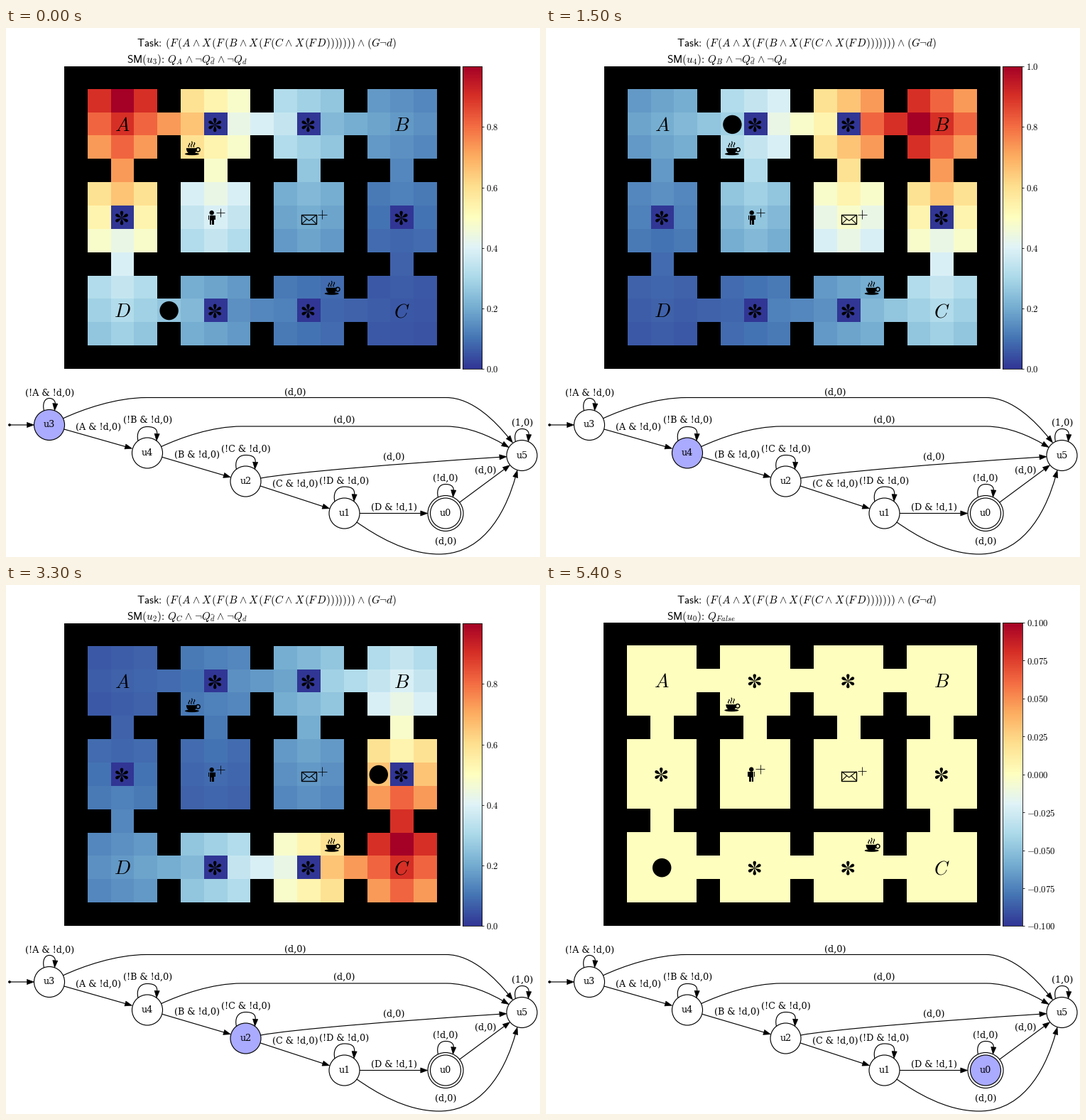
A matplotlib script that plays this animation: 752 by 745 pixels, repeating every 5.5 s.

```python
import numpy as np
import matplotlib.pyplot as plt
from matplotlib.animation import FuncAnimation
from matplotlib.patches import Circle, Ellipse, PathPatch, Polygon, Rectangle
from matplotlib.path import Path
from matplotlib.transforms import Affine2D

W, H, DPI = 752, 745, 64
COLS, ROWS, CELL = 17, 13, 32.8
FRAMES, STEP_MS = 55, 100
GAMMA = 0.9
ACTIVE = "#aaaaff"

plt.rcParams.update({"mathtext.fontset": "cm", "font.family": "DejaVu Serif"})


def px(v):
    """Pixels to points."""
    return v * 72 / DPI


def place(axes, left, top, right, bottom):
    axes.set_position([left / W, 1 - bottom / H, (right - left) / W, (bottom - top) / H])


def curve(points):
    """Chain of cubic Bezier segments."""
    return Path(points, [Path.MOVETO] + [Path.CURVE4] * (len(points) - 1))


# ---------------------------------------------------------------- grid world
DOORS = [(4, 2), (8, 2), (12, 2), (2, 4), (6, 4), (10, 4), (14, 4),
         (2, 8), (14, 8), (4, 10), (8, 10), (12, 10)]
BLOCKS = [(6, 2), (10, 2), (2, 6), (14, 6), (6, 10), (10, 10)]
MOVES = {"L": (-1, 0), "R": (1, 0), "U": (0, -1), "D": (0, 1)}

is_free = np.zeros((ROWS, COLS), bool)
for row in (1, 5, 9):
    for col in (1, 5, 9, 13):
        is_free[row:row + 3, col:col + 3] = True
for col, row in DOORS:
    is_free[row, col] = True


def value_map(goals):
    """Discounted distance to the nearest goal; blocks are worth nothing."""
    v = np.where(is_free, 0.0, np.nan)
    dist = {g: 0 for g in goals}
    queue = list(goals)
    for x, y in queue:
        v[y, x] = GAMMA ** dist[x, y]
        for dx, dy in MOVES.values():
            n = (x + dx, y + dy)
            if is_free[n[1], n[0]] and n not in BLOCKS and n not in dist:
                dist[n] = dist[x, y] + 1
                queue.append(n)
    return np.ma.masked_invalid(v)


# state, goal letter, goal cells, moves made while in the state
PHASES = [
    ("u3", "A", [(2, 1)], "LLUUULUURUUU"),
    ("u4", "B", [(13, 2)], "RRRDRRURRDRRURRR"),
    ("u2", "C", [(14, 9)], "DDDLDDRDDD"),
    ("u1", "D", [(2, 9), (1, 10)], "LLLDLLULLDLLULLL"),
    ("u0", None, [], ""),
]
MAPS = [value_map(p[2]) for p in PHASES]

route, phase_at = [(4, 10)], []
for i, phase in enumerate(PHASES):
    phase_at += [i] * max(len(phase[3]), 1)
    for m in phase[3]:
        x, y = route[-1]
        route.append((x + MOVES[m][0], y + MOVES[m][1]))

# ---------------------------------------------------------------- figure
fig = plt.figure(figsize=(W / DPI, H / DPI), dpi=DPI, facecolor="white")
page = fig.add_axes([0, 0, 1, 1])
page.set_xlim(0, W)
page.set_ylim(H, 0)
page.axis("off")

grid = fig.add_axes([0, 0, 1, 1])
cmap = plt.get_cmap("RdYlBu_r").copy()
cmap.set_bad("black")
image = grid.imshow(MAPS[0], cmap=cmap, extent=(0, COLS, ROWS, 0),
                    aspect="auto", interpolation="nearest")
grid.axis("off")

bar = fig.add_axes([0, 0, 1, 1])
bar.imshow(np.linspace(0, 1, 256)[:, None], cmap=cmap, origin="lower",
           extent=(0, 1, 0, 1), aspect="auto", interpolation="nearest")
bar.set_xticks([])
bar.yaxis.tick_right()
bar.tick_params(axis="y", length=px(3.2), width=px(0.8), pad=px(2.6), labelsize=px(12.7))
for spine in bar.spines.values():
    spine.set_linewidth(px(0.8))


# ---------------------------------------------------------------- map icons
class Icon:
    """Draws black shapes at pixel offsets, anchored near a cell's centre."""

    def __init__(self, col, row):
        self.tr = (Affine2D().translate(-1, 0.5).scale(1 / CELL)
                   .translate(col + 0.5, row + 0.5) + grid.transData)

    def fill(self, patch):
        patch.set(facecolor="black", edgecolor="none", transform=self.tr)
        grid.add_patch(patch)

    def rect(self, x0, y0, x1, y1):
        self.fill(Rectangle((x0, y0), x1 - x0, y1 - y0))

    def stroke(self, path, width):
        grid.add_patch(PathPatch(path, fill=False, edgecolor="black", lw=px(width),
                                 transform=self.tr))

    def plus(self, x, y, r=6.3):
        self.stroke(Path([(x - r, y), (x + r, y)]), 0.8)
        self.stroke(Path([(x, y - r), (x, y + r)]), 0.8)


PETAL = curve([(0, 0.5), (-0.5, -3), (-2.6, -6), (-2.1, -8.2), (-1.6, -10.5), (1.6, -10.5),
               (2.1, -8.2), (2.6, -6), (0.5, -3), (0, 0.5)])


def star(col, row):
    icon = Icon(col, row)
    for k in range(6):
        icon.fill(PathPatch(PETAL.transformed(Affine2D().rotate_deg(60 * k))))


def cup(col, row):
    icon = Icon(col, row)
    icon.fill(PathPatch(curve([(-7.5, 0), (-7.5, 5), (-5, 8), (0, 8), (5, 8),
                               (7.5, 5), (7.5, 0)])))
    icon.fill(Ellipse((0.5, 8.2), 20, 3.6))
    icon.stroke(Path.circle((9, 2.2), 2.8), 1.5)
    for x, top in ((-3.5, -7), (0, -9.5), (3.5, -8)):
        icon.stroke(curve([(x, -1.5), (x - 3, -4), (x + 3, -5.5), (x, top)]), 1.2)


def person(col, row):
    icon = Icon(col, row)
    icon.fill(Circle((-4.5, -7.3), 3.2))
    icon.rect(-7.5, -3.5, -1.5, 4)
    for x in (-9.5, -1.1):
        icon.rect(x, -3.5, x + 1.6, 3)
    for x in (-7.5, -4.2):
        icon.rect(x, 4, x + 2.7, 9.5)
    icon.plus(7.8, -7.6)


def envelope(col, row):
    icon = Icon(col, row)
    left, top, right, bottom = -9, -4.3, 12, 8.7
    icon.stroke(Path([(left, top), (right, top), (right, bottom), (left, bottom),
                      (left, top)], closed=True), 1.4)
    icon.stroke(Path([(left, top), (1.5, 4), (right, top)]), 1.1)
    icon.stroke(Path([(left, bottom), (-1.7, 1.7)]), 1.1)
    icon.stroke(Path([(right, bottom), (4.7, 1.7)]), 1.1)
    icon.plus(19.8, -5)


for block in BLOCKS:
    star(*block)
cup(5, 3)
cup(11, 9)
person(6, 6)
envelope(10, 6)
for letter, col, row in (("A", 2, 2), ("B", 14, 2), ("C", 14, 10), ("D", 2, 10)):
    grid.text(col + 0.49, row + 0.55, f"${letter}$", size=px(27), ha="center", va="center")

agent = Circle((0, 0), 13.2 / CELL, facecolor="black", edgecolor="none", zorder=6)
grid.add_patch(agent)

# ---------------------------------------------------------------- headings
AND = r"\hspace{0.05}\wedge\hspace{0.05}"
F = r"F\hspace{0.158}"
X = r"X\hspace{0.09}"
COLON = r"\hspace{-0.2}:"


def heading(x, y, s):
    return page.text(x, y, s, size=px(15.15), ha="left", va="baseline")


def goal_text(state, letter):
    head = rf"\mathsf{{SM(}}u_{state[1]}\mathsf{{){COLON}}}\hspace{{0.2}}"
    if letter is None:
        return f"${head}Q_{{False}}$"
    return rf"${head}Q_{letter}{AND}\neg Q_{{\widehat{{d}}}}{AND}\neg Q_d$"


heading(183.5, 26, rf"$\mathsf{{Task{COLON}}}\hspace{{0.2}}({F}(A{AND}{X}({F}(B{AND}{X}"
                   rf"({F}(C{AND}{X}({F}D))))))){AND}(G\neg d)$")
goal_line = heading(170, 49, "")

# ---------------------------------------------------------------- automaton
NODES = {"u3": (61, 559), "u4": (199, 598.5), "u2": (337.5, 638.5),
         "u1": (476.5, 683.5), "u0": (619, 683.5), "u5": (726.5, 602)}
RADIUS, RIM = 21.5, 25
LINE = px(1.15)


def label(x, y, s):
    page.text(x, y, s, size=px(12.8), ha="center", va="center", zorder=5)


def arrow(points, length=10, half=3.6):
    """Bezier chain whose last point is the tip of an arrowhead."""
    pts = np.array(points, float)
    tip = pts[-1].copy()
    d = tip - pts[-2]
    d /= np.hypot(*d)
    base = tip - length * d
    side = half * np.array([-d[1], d[0]])
    pts[-1] = base
    page.add_patch(PathPatch(curve(pts), fill=False, edgecolor="black", lw=LINE))
    page.add_patch(Polygon([tip, base + side, base - side], facecolor="black",
                           edgecolor="black", lw=px(0.6)))


def straight(a, b):
    a, b = np.array(a, float), np.array(b, float)
    arrow([a, a + (b - a) / 3, a + (b - a) * 2 / 3, b])


def loop(node, w, top, radius=RADIUS):
    cx, cy = NODES[node]
    base = cy - np.sqrt(radius ** 2 - w ** 2)
    arrow([(cx - w, base), (cx - w - 2.5, base - 10), (cx - w + 1, top), (cx, top),
           (cx + w - 1, top), (cx + w + 1, top + 5), (cx + w, base)])


discs = {}
for name, centre in NODES.items():
    if name == "u0":
        page.add_patch(Circle(centre, RIM, facecolor="white", edgecolor="black", lw=LINE))
    discs[name] = Circle(centre, RADIUS, facecolor="white", edgecolor="black", lw=LINE)
    page.add_patch(discs[name])
    label(*centre, name)

loop("u3", 7.5, 521.5)
loop("u4", 13, 561.5)
loop("u2", 13, 601.5)
loop("u1", 13.5, 646)
loop("u0", 10.5, 642.5, RIM)
loop("u5", 9, 564.5)

page.add_patch(Circle((5, 559), 1.9, color="black", lw=0))
straight((5, 559), (39.5, 559))
straight((81.7, 565), (177.5, 592.2))
straight((219.7, 604.3), (316.3, 632.7))
straight((358.2, 645), (455.6, 676.8))
straight((498, 683.5), (593.8, 683.5))
straight((638.8, 668), (709.6, 615.6))
arrow([(80.7, 549.7), (108, 537), (155, 520.5), (198, 520.5), (339, 520.5), (479, 520.5),
       (620, 520.5), (657, 520.5), (690, 555), (713.5, 584)])
arrow([(218.7, 589.5), (246, 577), (290, 561), (332, 561), (428, 561), (524, 561),
       (620, 561), (652, 561), (683, 576), (708, 590.5)])
arrow([(358.7, 634), (400, 626), (560, 613), (705, 603.7)])
arrow([(494, 696), (520, 714), (563, 741), (610, 741), (678, 741), (707, 670), (720, 623)])

for x, y, s in [
    (61.5, 514, "(!A & !d,0)"), (199.5, 552.5, "(!B & !d,0)"), (338, 593, "(!C & !d,0)"),
    (476.5, 638, "(!D & !d,0)"), (619, 634.5, "(!d,0)"), (727, 556.5, "(1,0)"),
    (130, 562.5, "(A & !d,0)"), (269, 601, "(B & !d,0)"), (407.5, 642.5, "(C & !d,0)"),
    (546, 675.5, "(D & !d,1)"), (407, 513, "(d,0)"), (476.5, 552.5, "(d,0)"),
    (546, 604, "(d,0)"), (675, 623, "(d,0)"), (619, 723.5, "(d,0)"),
]:
    label(x, y, s)


# ---------------------------------------------------------------- animation
def show_scale(letter):
    """Value range, colour bar ticks and layout for the current goal."""
    if letter is None:
        place(grid, 81, 52.5, 640, 480.5)
        place(bar, 643, 53, 671, 480.5)
        image.set_clim(-0.1, 0.1)
        ticks = np.linspace(-0.1, 0.1, 9)
        bar.set_yticks((ticks + 0.1) / 0.2, [f"${t + 0:.3f}$" for t in ticks])
    else:
        place(grid, 82, 54, 639.6, 480)
        place(bar, 642.5, 54, 670, 480.3)
        image.set_clim(0, 1)
        ticks = np.arange(6 if letter == "B" else 5) / 5
        bar.set_yticks(ticks, [f"${t:.1f}$" for t in ticks])
    bar.set_ylim(0, 1)


def update(frame):
    index = phase_at[frame]
    state, letter = PHASES[index][:2]
    image.set_data(MAPS[index])
    show_scale(letter)
    goal_line.set_text(goal_text(state, letter))
    for name, disc in discs.items():
        disc.set_facecolor(ACTIVE if name == state else "white")
    col, row = route[frame]
    agent.center = (col + 0.5, row + 0.5)
    return []


anim = FuncAnimation(fig, update, frames=FRAMES, interval=STEP_MS, repeat=True,
                     repeat_delay=0, blit=False)
plt.show()
```
